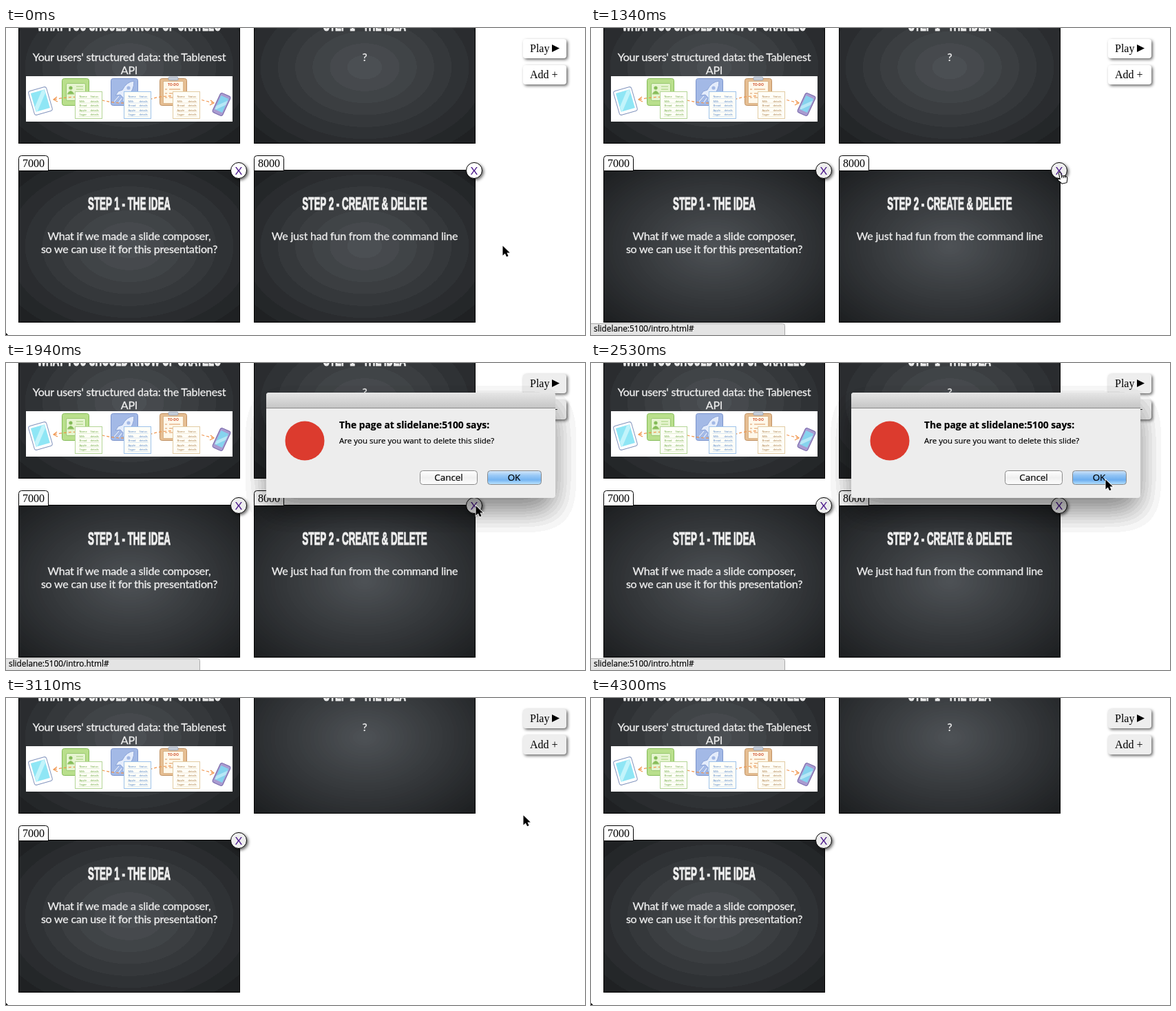
Recreate the animation shown at these times as an HTML page. Size 841x446 px, loop 4910 ms.

```html
<!DOCTYPE html>
<html lang="en">
<head>
<meta charset="utf-8">
<title>Slide composer</title>
<style>
html, body { margin: 0; width: 100%; height: 100%; overflow: hidden; background: #fff; }
svg { display: block; }
text { white-space: pre; }
.mid { text-anchor: middle; }
.title { font: bold 26px "Liberation Sans", Arial, sans-serif; fill: #eee; stroke: #eee; stroke-width: 1.2px; }
.body { font: 16px Lato, sans-serif; letter-spacing: -.2px; fill: #eee; stroke: #eee; stroke-width: .3px; }
.serif { font: 16px "Liberation Serif", Times, serif; }
.ui { font: 13.4px "Open Sans", "Noto Sans", sans-serif; stroke: #000; stroke-width: .2px; }
.tiny { font: 4px "Open Sans", sans-serif; }
.raised { filter: drop-shadow(2px 2px 2px #0009); }
.close text { font: 16px Lato, sans-serif; fill: #4b1a8b; }
</style>
</head>
<body>
<svg id="stage" width="841" height="446" viewBox="0 0 841 446"></svg>
<script>
const stage = document.getElementById('stage');

// Radial gradient made of flat rings
function rings(id, count) {
  const inner = [78, 82, 86], outer = [28, 30, 32];
  let stops = '';
  for (let i = 0; i < count; i++) {
    const mix = (i + .5) / count;
    const color = inner.map((c, k) => Math.round(c + (outer[k] - c) * mix));
    for (const at of [i, i + 1]) stops += `<stop offset="${at / count}" stop-color="rgb(${color})"/>`;
  }
  return `<radialGradient id="${id}" r=".707">${stops}</radialGradient>`;
}

function ramp(id, ...colors) {
  const stops = colors.map((c, i) => `<stop offset="${i / (colors.length - 1)}" stop-color="${c}"/>`);
  return `<linearGradient id="${id}" x2="0" y2="1">${stops.join('')}</linearGradient>`;
}

const label = (x, y, cls, text, extra = '') => `<text x="${x}" y="${y}" class="${cls}" ${extra}>${text}</text>`;

function card(id, x, y, title, lines, number) {
  const mid = x + 161;
  let out = `<rect id="${id}" x="${x + .5}" y="${y + .5}" width="321" height="221" fill="url(#coarse)" stroke="#000"/>
    <g transform="translate(${mid} ${y + 58}) scale(.514 1)">${label(0, 0, 'title mid', title)}</g>`;
  lines.forEach((line, i) => out += label(mid, y + 102 + i * 19, 'body mid', line));
  if (number) out += `
    <path d="M${x + .5} ${y + 1.5}v-18q0-4 4-4h35q4 0 4 4v18z" fill="#fff" stroke="#000"/>
    ${label(x + 22, y - 4, 'serif mid', number)}
    <g class="close"><circle class="raised" cx="${x + 320}" cy="${y + 1}" r="11.5" fill="#fff" stroke="#000"/>
    ${label(x + 320, y + 7, 'mid', 'X')}</g>`;
  return out;
}

function sheet(x, color, edge) {
  let out = `<rect x="${x}" y="92.5" width="39" height="39" fill="#fffef8" stroke="${edge}"/>`;
  ['Name', 'Milk', 'Bread', 'Apple', 'Sugar'].forEach((word, i) => {
    const y = 101 + i * 6.5;
    out += label(x + 6, y, 'tiny', word, `fill="${color}"`) + label(x + 22, y, 'tiny', i ? 'details' : 'Status', `fill="${color}"`) +
      `<path d="M${x + 5} ${y + 1.5}h30" stroke="${edge}" stroke-width=".4"/>`;
  });
  return out;
}

const tile = (x, fill, edge) => `<rect x="${x}" y="73.5" width="39" height="39" rx="3" fill="${fill}" stroke="${edge}"/>`;

const picture = `
  <rect x="29" y="70" width="300" height="66" fill="#fff"/>
  <g transform="rotate(-16 50 106)"><rect x="36.5" y="88" width="27" height="36" rx="3" fill="#fff" stroke="#8294bd"/>
    <rect x="39.5" y="91.5" width="21" height="28" fill="#8fe6f5"/><path d="M40 112L56 92h4v5L42 119h-2z" fill="#c3f4fb"/></g>
  ${tile(81.5, '#b9df8c', '#84bb58')}
  <rect x="87.5" y="80.5" width="28" height="25" rx="2" fill="#e6f4d0" stroke="#98c870"/>
  <circle cx="94" cy="87" r="2.6" fill="#84bb58"/><path d="M89 96q5-9 10 0zM102 85h10M102 89h10M102 93h8" fill="#84bb58" stroke="#a3cf78"/>
  ${tile(152.5, '#a3b9e6', '#7a93cc')}
  <path d="M186 77q-11 1-17 13l-6 2-4 6 7-1 4 4-1 7 6-4 2-6q9-7 9-21z" fill="#e4ecfb" stroke="#8ca4d8"/>
  <circle cx="178" cy="87" r="2.6" fill="#a3b9e6"/><path d="M164 99l-7 8M168 102l-5 7" stroke="#fff"/>
  ${tile(223.5, '#e6be92', '#be8f60')}
  <rect x="228.5" y="77.5" width="29" height="32" fill="#fff8ea" stroke="#d2a878" stroke-width=".7"/>
  <rect x="236" y="71" width="14" height="5" rx="1.5" fill="#c4ccd8" stroke="#8d97a8" stroke-width=".7"/>
  ${label(243, 84, 'tiny mid', 'TO-DO', 'fill="#d0532f" style="font-size:5px;font-weight:bold"')}
  <path d="M231 89h3m3 0h16M231 95h3m3 0h13M231 101h3m3 0h16" stroke="#d98c50" stroke-width=".9"/>
  <path d="M70 104Q105 96 140 105T211 103T300 109" fill="none" stroke="#f0934a" stroke-width="1.2" stroke-dasharray="4 3"/>
  <path d="M74 100l-5 4 6 3M297 105l5 4-6 3" fill="none" stroke="#f0934a" stroke-width="1.2"/>
  ${sheet(100.5, '#69a83e', '#b4d698')}${sheet(171.5, '#4f82c4', '#9dc2ea')}${sheet(242.5, '#a8793e', '#e2cca4')}
  <g transform="rotate(25 313 111)"><rect x="305" y="95.5" width="16" height="31" rx="3" fill="#a99bd0" stroke="#7566a8"/>
    <rect x="307" y="99.5" width="12" height="22" fill="#86d3ee"/><path d="M307 116l12-14v7l-10 12h-2z" fill="#b8e8f6"/></g>`;

const button = (y, text) => `<rect class="raised tool" x="751" y="${y}" width="63" height="28" rx="4" fill="#fff"/>${label(761, y + 19, 'serif', text)}`;

const push = (x, w, fill, id) => `<rect id="${id}" x="${x}" y="156.5" width="${w}" height="20" rx="4" fill="url(#${fill})" stroke="#8a8a8a"/>`;

const bands = Array.from({length: 14}, (_, i) => i * .038).join(' ');

stage.innerHTML = `
  <defs>
    ${rings('coarse', 9)}${rings('fine', 40)}
    ${ramp('bar', '#e6e6e6', '#c4c4c4')}${ramp('plain', '#fff', '#f0f0f0', '#fdfdfd')}
    ${ramp('light', '#d6e8fa', '#9bcaf6', '#76b5f2', '#bfe6ff')}${ramp('deep', '#a4c8f2', '#5a9fec', '#3887e4', '#8accff')}
    <filter id="soft" x="-.3" y="-.8" width="1.6" height="2.6" color-interpolation-filters="sRGB">
      <feGaussianBlur stdDeviation="22"/>
      <feComponentTransfer><feFuncA type="discrete" tableValues="${bands}"/></feComponentTransfer>
    </filter>
  </defs>
  ${card('cardA', 18, -54, 'WHAT YOU SHOULD KNOW OF CRATELO', ["Your users' structured data: the Tablenest", 'API'])}
  ${picture}
  ${card('cardB', 360, -54, 'STEP 1 - THE IDEA', ['?'])}
  ${card('cardC', 18, 206, 'STEP 1 - THE IDEA', ['What if we made a slide composer,', 'so we can use it for this presentation?'], 7000)}
  <g id="doomed">${card('cardD', 360, 206, 'STEP 2 - CREATE &amp; DELETE', ['We just had fun from the command line'], 8000)}</g>
  ${button(16, 'Play')}<path d="M793 24v11l11-5.5z"/>
  ${button(54, 'Add +')}
  <path d="M0 443l3 3H0z"/>
  <g id="status"><path d="M-.5 429.5h279q3 0 3 3v14h-282z" fill="#e4e4e4" stroke="#aaa"/>
    ${label(4, 441, 'ui', 'slidelane:5100/intro.html#', 'style="font-size:11.8px"')}</g>
  <g id="dialog">
    <rect id="shade" x="378" y="63" width="420" height="153" filter="url(#soft)"/>
    <rect x="378" y="43" width="420" height="153" rx="4" fill="#ededed"/>
    <path d="M378 66V47q0-4 4-4h412q4 0 4 4v19z" fill="url(#bar)"/><path d="M378 65.5h420" stroke="#8a8a8a"/>
    <circle cx="434" cy="113" r="28.5" fill="#dc3b2e"/>
    ${label(484, 95, 'ui', 'The page at slidelane:5100 says:', 'style="font-size:13.8px;font-weight:bold"')}
    ${label(484, 117, 'ui', 'Are you sure you want to delete this slide?', 'style="font-size:11.5px"')}
    ${push(601.5, 83, 'plain', 'cancel')}${push(699.5, 78, 'light', 'ok')}${push(699.5, 78, 'deep', 'pulse')}
    ${label(643, 171, 'ui mid', 'Cancel')}${label(738, 171, 'ui mid', 'OK')}
  </g>
  <g id="cursor">
    <path id="arrow" d="M1.5 1.5V15.5L4.8 12.5L7.1 17.3L9.6 16.2L7.4 11.5H11.8Z" stroke="#fff" paint-order="stroke" stroke-width="1.6"/>
    <path id="hand" d="M5 11V3Q5 1 6.5 1T8 3V7.5Q9 6.5 10.5 7.5Q12 7 13 8.5Q15.5 8.5 15.5 10.5V13L13.5 18H6.5L1.5 11.5Q2 9 5 11ZM8 7.5V10M10.5 7.5V10.5M13 8.5V11" fill="#fff" stroke="#000" transform="rotate(-12 8 10)"/>
  </g>`;

const LOOP = 4910, HOVER = 1200, POPUP = 1790, OPEN = 1940, OVER_OK = 2670, DELETED = 3110;

// time, x, y, hand?
const poses = [
  [0, 720, 315], [600, 719, 313], [750, 699, 254], [900, 686, 232], [1050, 679, 214],
  [HOVER, 676, 208, 1], [POPUP, 681, 206], [OPEN, 681, 206], [2090, 681, 206], [2230, 682, 206],
  [2380, 737, 177], [2530, 746, 168], [OVER_OK, 747, 169, 1], [2820, 747, 169, 1], [2960, 747, 169, 1],
  [DELETED, 750, 169], [3860, 750, 207], [4010, 786, 366], [4160, 799, 433], [4300, 900, 500]
];

const el = id => document.getElementById(id);
const show = (id, on) => el(id).style.display = on ? '' : 'none';
const set = (id, name, value) => el(id).setAttribute(name, value);
const tint = (selector, on) => document.querySelectorAll(selector).forEach(e => e.setAttribute('fill', on ? '#eee' : '#fff'));

function draw(now) {
  const t = now % LOOP;
  const [held, x, y, hand] = poses.findLast(p => p[0] <= t);
  const opened = t >= OPEN;

  set('cursor', 'transform', `translate(${x} ${y})`);
  show('hand', hand);
  show('arrow', !hand);

  show('status', t >= HOVER && t < OVER_OK);
  show('doomed', t < DELETED);
  const lower = t >= HOVER && t < OVER_OK ? 'url(#fine)' : 'url(#coarse)';
  set('cardC', 'fill', lower);
  set('cardD', 'fill', lower);
  set('cardB', 'fill', t >= DELETED ? 'url(#fine)' : 'url(#coarse)');
  tint('.close circle', t >= HOVER);
  tint('.tool', opened);

  show('dialog', t >= POPUP && t < DELETED);
  show('shade', opened);
  set('dialog', 'opacity', opened ? 1 : .45);
  set('dialog', 'transform', opened ? '' : 'translate(518 94) scale(.3333) translate(-378 -43)');
  set('pulse', 'opacity', .4 - .4 * Math.cos((held - OPEN) / 680 * 2 * Math.PI));

  requestAnimationFrame(draw);
}
draw(0);
</script>
</body>
</html>
```
